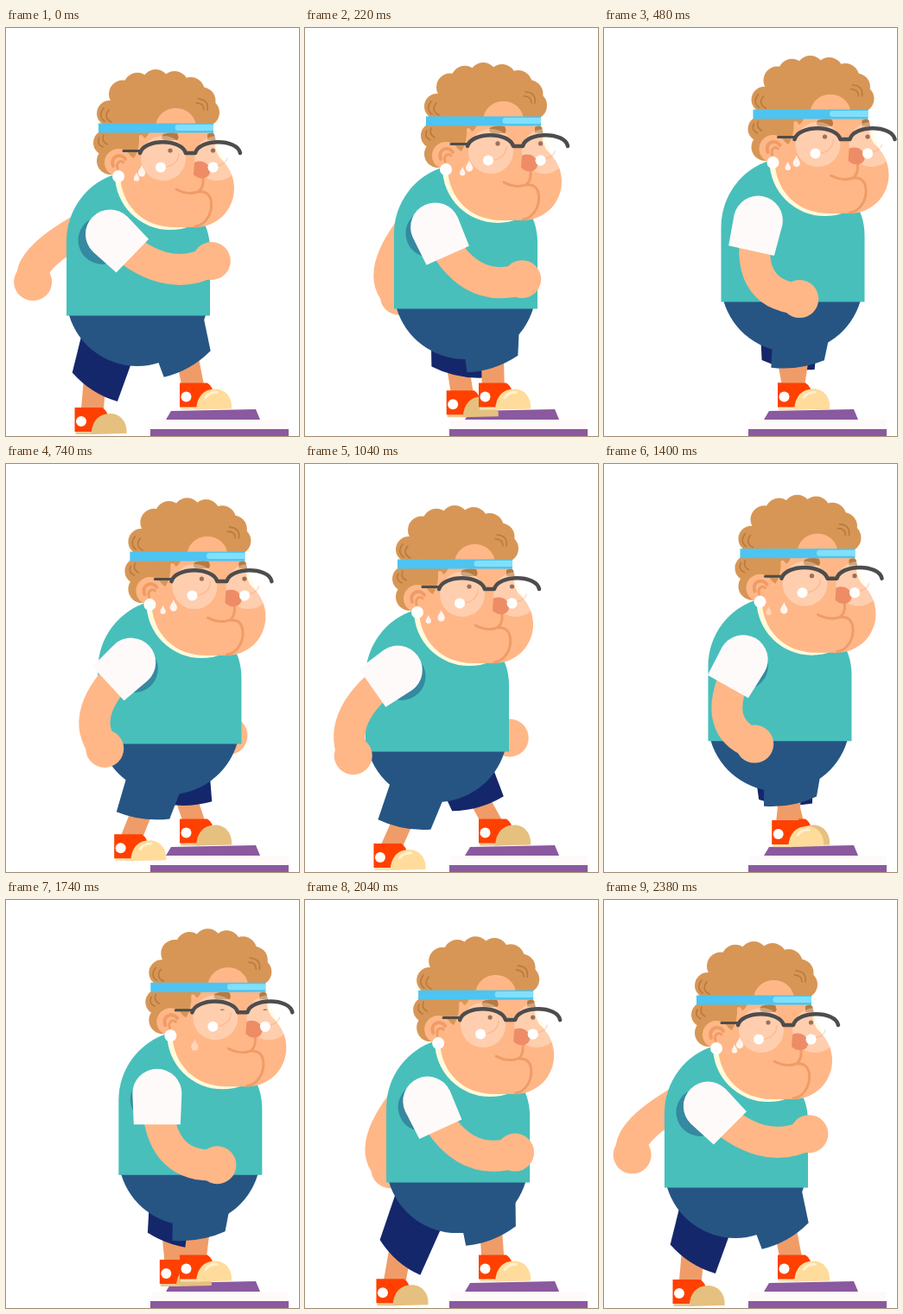
An HTML page with a canvas that plays this animation: 339x473 px, repeating every 2400 ms.

```html
<!DOCTYPE html>
<html lang="en">
<head>
<meta charset="utf-8">
<title>Step workout</title>
<style>
  html, body { margin: 0; width: 100%; height: 100%; overflow: hidden; background: #fff; }
  canvas { display: block; }
</style>
</head>
<body>
<canvas id="stage" width="339" height="473"></canvas>
<script>
const ctx = document.getElementById('stage').getContext('2d');
const LOOP = 2400;
const SKIN = '#ffb787', SKIN_DARK = '#f09c68', HAIR = '#d79655', CURL = '#b97a40';
const TEAL = '#48bfbb', SHORTS = '#265584', SHORTS_DARK = '#15276b', PURPLE = '#8b599f';

const clamp = v => Math.max(0, Math.min(1, v));
const rad = deg => deg * Math.PI / 180;
const progress = (t, from, to) => clamp((t - from) / (to - from));
const ease = (t, from, to) => (1 - Math.cos(Math.PI * progress(t, from, to))) / 2;

// The body climbs twice per loop; each foot leads its half of the movement.
const bodyRise = t => ease(t, 0, 440) - ease(t, 545, 967) + ease(t, 1045, 1567) - ease(t, 1606, 2350);
const nearStep = t => 1 - ease(t, 545, 883) + ease(t, 1045, 1465);
const farStep = t => ease(t, 0, 353) - ease(t, 1600, 2090);

// 0: near arm forward and far arm back, 1: the reverse.
function armSwing(t) {
  const p = t < 900 ? progress(t, 0, 900) : 1 - progress(t, 900, LOOP);
  return .6 * p + .4 * ease(p, 0, 1);
}

function fill(path, color) {
  ctx.fillStyle = color;
  ctx.fill(new Path2D(path));
}
function line(path, color, width) {
  ctx.strokeStyle = color;
  ctx.lineWidth = width;
  ctx.lineCap = ctx.lineJoin = 'round';
  ctx.stroke(new Path2D(path));
}
function oval(x, y, rx, color, ry = rx) {
  ctx.fillStyle = color;
  ctx.beginPath();
  ctx.ellipse(x, y, rx, ry, 0, 0, Math.PI * 2);
  ctx.fill();
}
function rect(x, y, w, h, color) {
  ctx.fillStyle = color;
  ctx.fillRect(x, y, w, h);
}
function at(x, y, draw) {
  ctx.save();
  ctx.translate(x, y);
  draw();
  ctx.restore();
}

function drawSteps() {
  fill('M191 444L289 442L294 454H185Z', PURPLE);
  rect(168, 454, 159, 11, '#fffafa');
  rect(167, 465, 160, 8, PURPLE);
}

function drawShoe(x, y, near) {
  at(x, y, () => {
    fill('M1 26H24V31H1Z', near ? '#fbe3b5' : '#e9c890');
    fill('M0 0H32Q38 4 39 12L22 28H0Z', '#ff4000');
    oval(7.5, 16, 6, '#fff');
    fill('M19 31C20 15 28 7 41 7C53 7 61 17 60 30Z', near ? '#ffdc9b' : '#e6c07f');
    if (near) line('M30 17Q35 10 43 11', '#fff0cf', 3);
  });
}

function drawLeg(hipX, hipY, step, near) {
  const x = 79.5 + 121.5 * step, y = 440 - 28.5 * step;
  const reach = hipX - x - 16;
  const ankle = x + 18 + .04 * reach;
  const cuffX = x + 16 + (near ? 7 + .22 * reach : -4 + .2 * reach);
  const cuffY = y - (near ? 22 : 21 + .05 * reach);
  const angle = rad(near ? .33 * reach - 8 : .4 * reach + 10);
  const dx = 31 * Math.cos(angle), dy = 31 * Math.sin(angle);
  const top = hipX + (near ? 16 : -2) - .37 * reach;

  fill(`M${cuffX - 13} ${cuffY - 8}H${cuffX + 13}L${ankle + 13} ${y + 4}H${ankle - 13}Z`, SKIN_DARK);
  drawShoe(x, y, near);
  fill(`M${top - 36} ${hipY}L${cuffX - dx} ${cuffY - dy}
    Q${cuffX - 8 * Math.sin(angle)} ${cuffY + 8} ${cuffX + dx} ${cuffY + dy}
    L${top + 36} ${hipY}Z`, near ? SHORTS : SHORTS_DARK);
}

function drawArm(x, y, angle, handX, handY) {
  const elbowX = x + 88 * Math.sin(rad(angle)), elbowY = y + 88 * Math.cos(rad(angle));
  line(`M${x} ${y}Q${elbowX} ${elbowY} ${handX} ${handY}`, SKIN, 36);
  oval(handX, handY, 22, SKIN);
}

function drawFarArm(swing) {
  const handX = 31 + 220 * swing, side = handX - 140;
  drawArm(100, 226, 110 * swing - 62, handX, 335 + .08 * side - .0027 * side * side);
}

function drawNearArm(swing) {
  const angle = 46 - 108 * swing, bend = angle * angle;
  const x = 114.5 + .13 * angle, y = 239;
  drawArm(x, y, angle, 184 + 1.7 * angle - .0115 * bend, 322 - .75 * angle - .0083 * bend);
  at(x, y, () => {
    ctx.rotate(-rad(angle));
    fill('M-27 36L-28.5 0A28.5 28.5 0 0 1 28.5 0L27 36Z', '#fffafa');
  });
}

function drawTorso() {
  fill('M73 333A82.4 82.4 0 0 0 231 333V328H73Z', SHORTS);
  fill('M70 333.5V246A81 81 0 0 1 128 169L222 215Q236 232 236 257V333.5Z', TEAL);
  oval(111.5, 246, 28, '#3589a0');
}

function drawHair() {
  oval(177, 100, 56, HAIR, 36);
  oval(120, 99, 15, HAIR);
  for (let i = 0; i < 7; i++) {
    const a = .68 + .41 * i;
    oval(177 - 54 * Math.cos(a), 98 - 34 * Math.sin(a), 16, HAIR);
  }
  oval(116, 133, 15, HAIR);
  oval(121, 154, 16, HAIR);
  oval(137, 136, 21, HAIR);
}

function drawGlasses() {
  const frame = '#4e4c4d';
  line('M155 145C160 128 203 128 208 145H219C223 128 268 128 271 145', frame, 4.5);
  line('M136 142.5H155', frame, 3);
}

function drawDrop(x, y, size, alpha) {
  at(x, y, () => {
    ctx.globalAlpha = alpha;
    ctx.scale(size, size);
    fill('M0 -6C1 -2 4 0 4 3A4 4 0 0 1 -4 3C-4 0 -1 -2 0 -6Z', '#fff4ee');
  });
}

// Each drop slides down and fades, then swells again before the loop restarts.
function drawSweat(t, x, y, driftX, driftY, life, size) {
  const reborn = t > 2050;
  const grow = reborn ? progress(t, 2050, 2300) : 1;
  const slide = reborn ? 0 : t / life;
  drawDrop(x + driftX * slide, y + driftY * slide, size * grow,
    reborn ? grow : 1 - progress(t, life - 140, life + 130));
}

function drawHead(t) {
  oval(190, 170, 64, '#fffadb');
  drawHair();
  fill(`M146 121H240C241 134 242 143 247 150C258 160 264 172 264 186
    C264 211 244 231 219 231H195C158 231 133 205 132 170Z`, SKIN);
  fill('M173 114C176 86 217 86 220 114Z', SKIN);
  fill('M140 119H166Q164 127 160 128Q157 122 154 125Q155 140 148 151L136 143Z', HAIR);
  line('M113 93Q106 102 114 108M119 95Q112 104 122 109', CURL, 1.6);
  line('M222 82Q235 83 233 95M220 87Q229 87 229 95', CURL, 1.6);
  line('M108 127Q104 134 112 138M113 124Q110 131 117 135', CURL, 1.6);

  oval(130, 156, 16, SKIN);
  line('M124 160C120 147 134 145 138 152', SKIN_DARK, 4);
  line('M129 163C127 155 133 153 136 156', SKIN_DARK, 3);
  oval(130, 172, 7, '#fff');

  fill('M182 123Q190 120 198 122Q201 127 198 130H183Q178 127 182 123Z', CURL);
  fill('M233 123Q238 120 241 123L243 131Q238 129 233 130Z', CURL);
  rect(107, 110.5, 133, 11, '#4dc4f1');
  fill('M199 112H240V119H199A3.5 3.5 0 0 1 199 112Z', '#80e0fc');

  line('M197 187Q210 194 222 190Q229 186 228 174', SKIN_DARK, 3);
  line('M224 190C240 188 241 211 232 222Q227 229 219 230', SKIN_DARK, 3);

  const open = .3 + .7 * progress(Math.abs(t - 1740), 8, 80);
  for (const [lensX, eyeX, gleamX] of [[182, 190, 179], [244, 239.5, 239.5]]) {
    oval(lensX, 151, 26, 'rgba(255,255,255,.32)');
    oval(gleamX, 161.5, 6, '#fff');
    oval(eyeX, 142, 2.6, '#9b705c', 2.6 * open);
  }
  line('M186 161Q199 158 200 146M245 160Q255 157 256 151', 'rgba(240,156,104,.35)', 1.5);
  fill('M218 156C226 152 236 157 236 166C236 175 224 177 217 170Z', '#ee8c67');
  oval(239.5, 161.5, 6, '#fff');
  drawGlasses();

  drawSweat(t, 151, 172, -11, 10, 1400, .8);
  drawSweat(t, 157, 165, 1, 17, 1740, 1.05);
}

function render(t) {
  const rise = bodyRise(t), swing = armSwing(t);
  const x = 65.5 * rise, y = -16 * rise;
  rect(0, 0, 339, 473, '#fff');
  drawSteps();
  at(x, y, () => drawFarArm(swing));
  drawLeg(152 + x, 333 + y, farStep(t), false);
  drawLeg(152 + x, 333 + y, nearStep(t), true);
  at(x, y, () => {
    drawTorso();
    drawHead(t);
    drawNearArm(swing);
  });
}

const start = performance.now();
function tick() {
  render((performance.now() - start) % LOOP);
  requestAnimationFrame(tick);
}
tick();
</script>
</body>
</html>
```
